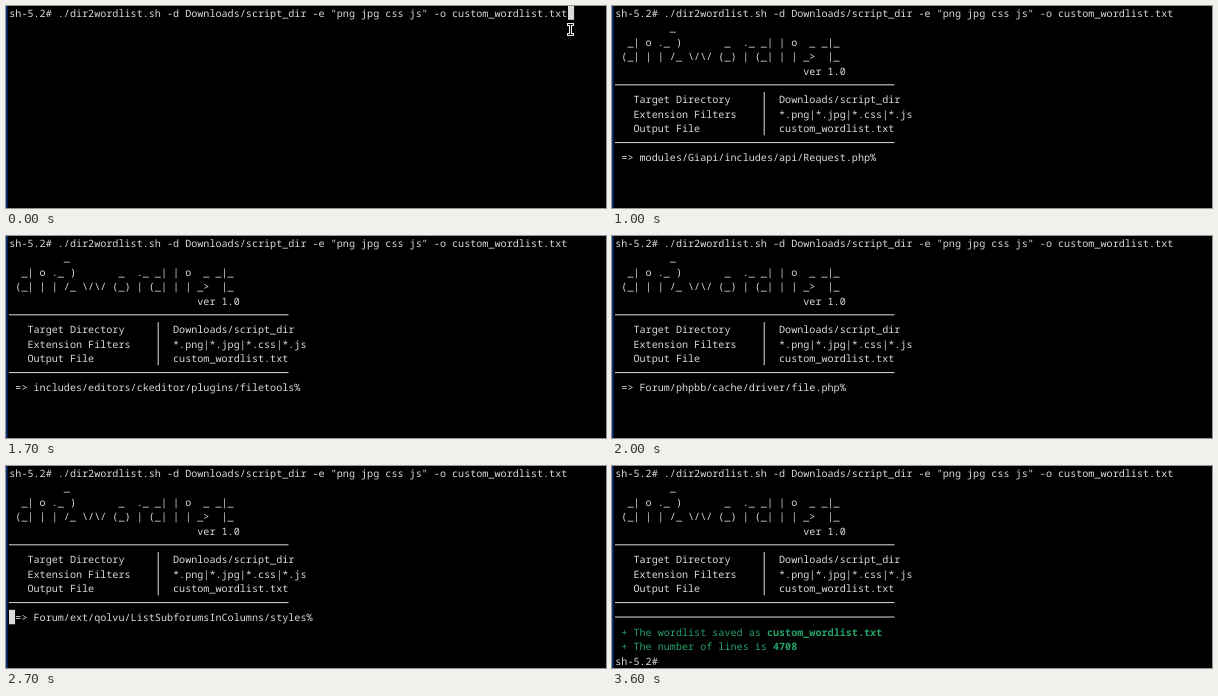
Animation of 600x202 px, one loop 3700 ms. Source, as an HTML page with a canvas:

```html
<!DOCTYPE html>
<html lang="en">
<head>
<meta charset="utf-8">
<title>dir2wordlist</title>
<style>
  html, body { margin: 0; width: 100%; height: 100%; overflow: hidden; background: #000; }
  canvas { position: absolute; left: 0; top: 0; }
  .row {
    position: absolute; left: 3.25px; height: 14.44px; white-space: pre;
    font: 10.127px/14.44px "Noto Sans Mono", "DejaVu Sans Mono", monospace;
    font-variant-ligatures: none; text-rendering: geometricPrecision;
    color: #dadada;
  }
  .row.ok { color: #26a269; }
</style>
</head>
<body>
<canvas id="stage" width="600" height="202"></canvas>
<script>
const LOOP = 3700, START = 1000, DONE = 3300, STEP = 100;
const CELL_W = 6.076, CELL_H = 14.44, LEFT = 3, TOP = -0.6;
const TEXT_DROP = 0.4;
const INK = '#dadada';
const ctx = document.getElementById('stage').getContext('2d');

const command = 'sh-5.2# ./dir2wordlist.sh -d Downloads/script_dir -e "png jpg css js" -o custom_wordlist.txt';
const field = (name, value) => '   ' + name.padEnd(24) + value;
const banner = [
  '         _',
  '  _| o ._ )       _  ._ _| | o  _ _|_',
  ' (_| | | /_ \\/\\/ (_) | (_| | | _>  |_',
  ' '.repeat(31) + 'ver 1.0',
  '',
  field('Target Directory', 'Downloads/script_dir'),
  field('Extension Filters', '*.png|*.jpg|*.css|*.js'),
  field('Output File', 'custom_wordlist.txt')
];

const paths = [
  'modules/Giapi/includes/api/Request.php',
  'modules/Giapi/includes/vendor/autoload.php',
  'modules/Giapi/includes/vendor/phpseclib/phpseclib',
  'modules/Giapi/includes/vendor/phpseclib/phpseclib/phpseclib/Crypt/EC/Curves/secp384r1.php',
  'modules/Giapi/includes/views/index.php',
  'includes/editors/ckeditor/lang',
  'includes/editors/ckeditor/plugins/dialog',
  'includes/editors/ckeditor/plugins/filetools',
  'includes/editors/ckeditor/skins/moono',
  'includes/classes/database/query.php',
  'Forum/phpbb/cache/driver/file.php',
  'Forum/phpbb/console/command/extension/disable.php',
  'Forum/phpbb/db/migration/data/v310',
  'Forum/phpbb/db/migration/data/v330/dev.php',
  'Forum/phpbb/notification/type/post.php',
  'Forum/styles/prosilver/template',
  'Forum/ext/phpbb/viglink/config',
  'Forum/ext/qolvu/ListSubforumsInColumns/styles',
  'Forum/language/en/acp/forums.php',
  'Forum/vendor/symfony/dependency-injection/Compiler/AliasPass.php',
  'Forum/vendor/symfony/finder/Finder.php',
  'Forum/vendor/twig/twig/src/Node',
  'Forum/includes/ucp/ucp_profile.php'
];

const rowTop = r => TOP + r * CELL_H;
const rows = Array.from({ length: 14 }, (_, r) => {
  const el = document.createElement('div');
  el.className = r === 11 || r === 12 ? 'row ok' : 'row';
  el.style.top = rowTop(r) + TEXT_DROP + 'px';
  return document.body.appendChild(el);
});
rows[0].textContent = command;

function setRow(r, html) {
  if (rows[r].shown === html) return;
  rows[r].innerHTML = rows[r].shown = html;
}

function rule(r) {
  ctx.fillStyle = INK;
  ctx.fillRect(LEFT, rowTop(r) + CELL_H / 2 - 0.5, 46 * CELL_W, 1);
}

function divider() {
  ctx.fillStyle = INK;
  ctx.fillRect(151.7, rowTop(6), 1, 3 * CELL_H);
}

function block(col, r) {
  ctx.fillStyle = INK;
  ctx.fillRect(LEFT + col * CELL_W, rowTop(r), CELL_W, CELL_H);
}

function pointer(x, top, bottom) {
  ctx.beginPath();
  for (const y of [top, bottom]) {
    ctx.moveTo(x - 2, y);
    ctx.lineTo(x + 2, y);
  }
  ctx.moveTo(x, top);
  ctx.lineTo(x, bottom);
  ctx.lineCap = 'square';
  ctx.strokeStyle = '#f0f0f0';
  ctx.lineWidth = 3;
  ctx.stroke();
  ctx.strokeStyle = '#101214';
  ctx.lineWidth = 1;
  ctx.stroke();
}

function blinkOn(t) {
  return t < 700 || (t >= 1200 && t < 1700) || (t >= 2200 && t < 2800);
}

function draw(t) {
  const running = t >= START, done = t >= DONE;

  ctx.fillStyle = '#000';
  ctx.fillRect(0, 0, 600, 202);
  ctx.fillStyle = '#0a3274';
  ctx.fillRect(0, 0, 1.6, 202);

  banner.forEach((line, i) => setRow(i + 1, running ? line.replace('>', '&gt;') : ''));
  const path = running && !done ? paths[Math.floor((t - START) / STEP)] : '';
  setRow(10, path ? ' =&gt; ' + path + '%' : '');
  setRow(11, done ? ' + The wordlist saved as <b>custom_wordlist.txt</b>' : '');
  setRow(12, done ? ' + The number of lines is <b>4708</b>' : '');
  setRow(13, done ? 'sh-5.2#' : '');

  if (running) {
    rule(5);
    rule(9);
    divider();
  } else {
    pointer(564.5, 18.5, 28.5);
  }
  if (done) rule(10);
  if (blinkOn(t)) block(running ? 0 : command.length, running ? 10 : 0);
}

const begin = performance.now();
function tick() {
  draw((performance.now() - begin) % LOOP);
  requestAnimationFrame(tick);
}
tick();
</script>
</body>
</html>
```
